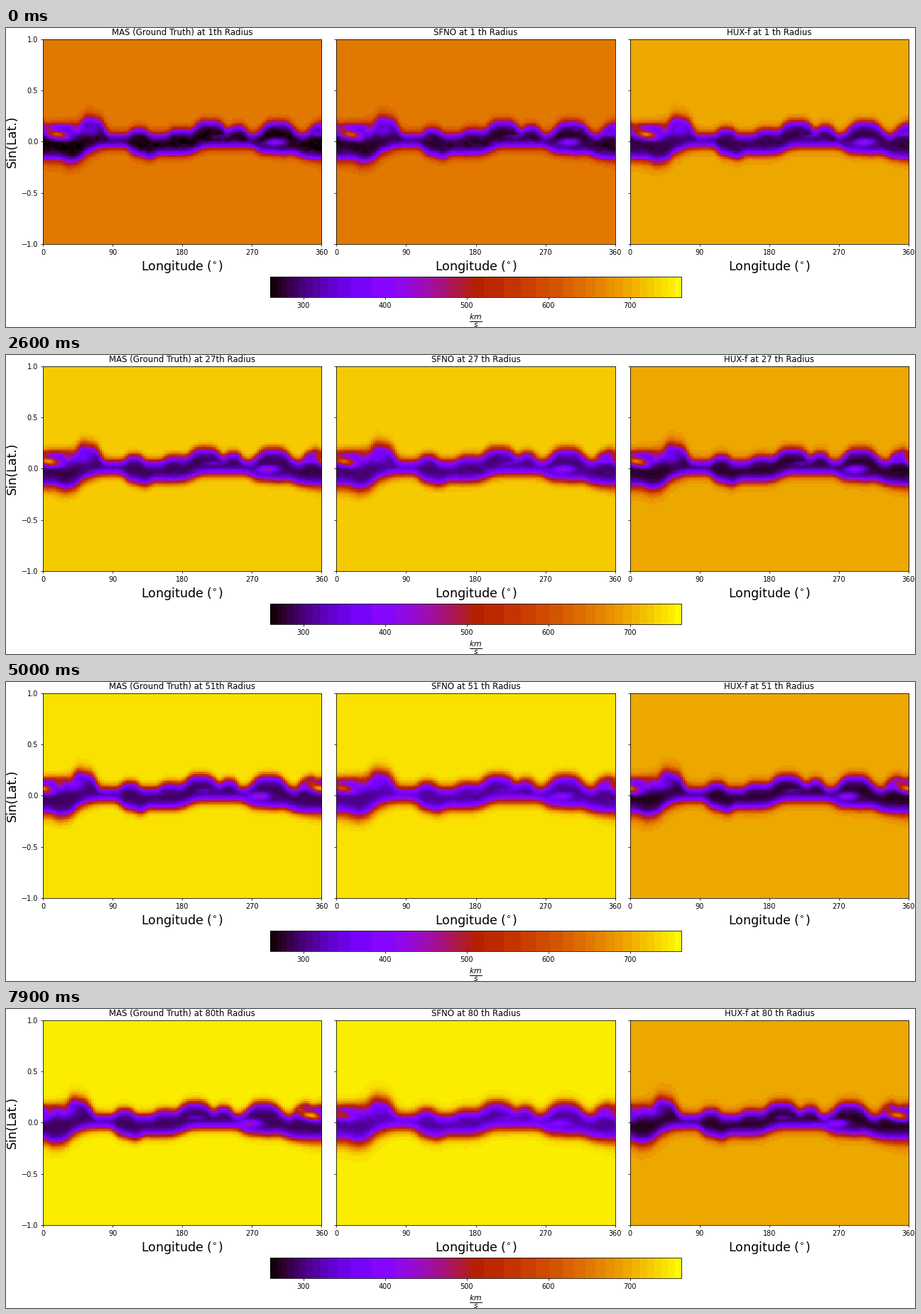
Animation of 1280 by 422 pixels, one loop 8000 ms. Source, as a matplotlib script:

```python
import numpy as np
import matplotlib.pyplot as plt
from matplotlib.animation import FuncAnimation
from matplotlib.colors import BoundaryNorm, ListedColormap

W, H, DPI = 1280, 422, 64
FRAMES, INTERVAL = 80, 100
SLOWEST, FASTEST = 259.5, 763  # km/s
S = 70.2 / DPI  # keeps point sizes at their look on a 70.2 dpi canvas

plt.rcParams.update({
    "font.family": "DejaVu Sans",
    "font.size": 10 * S,
    "axes.linewidth": 0.8 * S,
    "axes.labelpad": 4 * S,
    "axes.titlepad": 6 * S,
})
for axis in ("xtick", "ytick"):
    plt.rcParams.update({
        f"{axis}.major.size": 3.5 * S,
        f"{axis}.major.width": 0.8 * S,
        f"{axis}.major.pad": 3.5 * S,
    })


def stepped_scale(bands):
    """Split gnuplot into bands of equal visible colour change."""
    cmap = plt.get_cmap("gnuplot")
    x = np.linspace(0, 1, 256)
    change = np.diff(cmap(x)[:, :3], axis=0) * (0.6, 1, 0.5)
    path = np.append(0, np.cumsum(np.linalg.norm(change, axis=1)))
    cuts = np.interp(np.linspace(0, path[-1], bands + 1), path, x)
    colours = cmap((cuts[:-1] + cuts[1:]) / 2)
    levels = SLOWEST + (FASTEST - SLOWEST) * cuts
    return ListedColormap(colours), BoundaryNorm(levels, bands)


CMAP, NORM = stepped_scale(44)

# Bulges of the slow belt's edges: longitude, half width, height.
# Heights are hundredths of sin(latitude).
TOP_BASE, BOTTOM_BASE = 8, 6.5
TOP = [(26, 32, 9), (66, 15, 14), (124, 12, 5.5), (176, 14, 4.7),
       (215, 22, 12.5), (252, 11, 8), (303, 22, 12), (352, 10, 6.5)]
BOTTOM = [(10, 52, 12), (40, 14, 4), (128, 17, 8), (168, 34, 7.5),
          (296, 22, 6)]

# Faster patches inside the belt: longitude, height, widths, slope, strength
PATCHES = [
    (18.5, 6.8, 10, 3, -0.12, 0.92),
    (6, 12.5, 4, 2, -0.1, 0.4),
    (42, 11.5, 4, 3.5, -0.2, 0.35),
    (61, 11.5, 10, 5, 0, 0.2),
    (300, -0.8, 8.5, 2.3, 0.03, 0.38),
    (352, 7, 6.5, 2, 0.05, 0.2),
    (230, 5, 7, 1.3, 0.02, 0.12),
]

NLON, NLAT = 128, 111
lons = (np.arange(NLON) + 0.5) * 360 / NLON
heights = np.linspace(-100, 100, NLAT)[:, None]

rng = np.random.default_rng(4)


def make_waves(count, max_lon, max_lat):
    return [(rng.integers(3, max_lon), rng.uniform(-max_lat, max_lat),
             rng.uniform(0, 2 * np.pi)) for _ in range(count)]


def ripple(waves, lon):
    """Smooth noise of unit size, periodic in longitude."""
    x = np.radians(lon)
    total = sum(np.cos(m * x + n * heights + p) for m, n, p in waves)
    return total * np.sqrt(2 / len(waves))


GRAIN = make_waves(24, 45, 0.8)
MOTTLE = make_waves(40, 30, 0.6)


def settle(k, pace):
    """Ease from 0 towards 1."""
    return 1 - np.exp(-k / pace)


def lon_gap(lon, centre):
    return (lon - centre + 180) % 360 - 180


def bulge(lon, centre, width):
    return np.exp(-(lon_gap(lon, centre) / width) ** 4)


def edge(lon, base, bulges):
    return base + sum(h * bulge(lon, c, w) for c, w, h in bulges)


def falloff(depth, width, halo):
    """Share of fast wind at a depth below the belt's edge."""
    d = depth - 0.7
    scale = np.where(d < 0, 0.7 * width * (1 + halo), width)
    return 1 / (1 + np.exp(np.clip(d / scale, -30, 30)))


def wind(edge_shift, core_shift, fast, slow, width, grain,
         fade=1, passes=1):
    """Slow belt whose core drifts faster than its edges."""
    rim, core = lons + edge_shift, lons + core_shift
    upper = falloff(edge(rim, TOP_BASE, TOP) - heights, width,
                    0.55 * bulge(rim, 64, 24))
    lower = falloff(heights + edge(rim, BOTTOM_BASE, BOTTOM), width,
                    0.55 * bulge(rim, 34, 38))
    share = np.maximum(upper, lower)
    for x, y, sx, sy, slope, strength in PATCHES:
        dx = lon_gap(core, x)
        dy = heights - y - slope * dx
        blob = np.exp(-((dx / sx) ** 2 + (dy / sy) ** 2) / 2)
        share = share + fade * strength * blob * (1 - share)
    v = slow + (fast - slow) * share
    v = v + grain * ripple(GRAIN, core) * (1 - share) ** 2
    for _ in range(passes):
        v = (np.roll(v, 1, 1) + 2 * v + np.roll(v, -1, 1)) / 4
    return v


def fast_wind(k):
    return 650 + 102 * settle(k ** 0.85, 11.5)


def mas(k):
    return wind(0.235 * k, 0.417 * k, fast_wind(k),
                260 + 27 * settle(k, 12), 2.6, 6 * np.exp(-k / 20))


def sfno(k):
    drift = settle(k, 25)
    v = wind(8 * drift, 12 * drift, fast_wind(k),
             270 + 39 * settle(k, 30), 2.7 + 0.5 * k / FRAMES, 6,
             1 - 0.45 * k / FRAMES, 1 + k // 20)
    zone = np.exp(-((np.abs(heights) - 42) / 16) ** 2)
    return v - 0.45 * np.maximum(ripple(MOTTLE, lons), 0) * zone


def hux(k):
    return wind(0.25 * k, 0.45 * k - 2, 695, 280 - 12 * settle(k, 20),
                2.6 + 0.4 * k / FRAMES, 4 * np.exp(-k / 15))


PANELS = [
    ("MAS (Ground Truth) at {}th Radius", mas),
    ("SFNO at {} th Radius", sfno),
    ("HUX-f at {} th Radius", hux),
]

fig = plt.figure(figsize=(W / DPI, H / DPI), dpi=DPI, facecolor="white")


def add_axes(left, top, right, bottom):
    return fig.add_axes([left / W, 1 - bottom / H,
                         (right - left) / W, (bottom - top) / H])


views = []
for i, (title, field) in enumerate(PANELS):
    left = 52 + 413.4 * i
    ax = add_axes(left, 15.6, left + 392.2, 305.2)
    image = ax.imshow(field(0), extent=(0, 360, -1, 1), origin="lower",
                      aspect="auto", interpolation="nearest",
                      cmap=CMAP, norm=NORM)
    ax.set_xticks(range(0, 361, 90))
    ax.set_yticks([-1, -0.5, 0, 0.5, 1])
    ax.set_xlabel(r"Longitude ($^{\circ}$)", fontsize=18 * S)
    if i == 0:
        ax.set_ylabel("Sin(Lat.)", fontsize=18 * S)
    else:
        ax.tick_params(labelleft=False)
    views.append((image, ax.set_title(title.format(1))))

bar = fig.colorbar(views[0][0], cax=add_axes(372.4, 351.2, 951.3, 380.3),
                   orientation="horizontal", spacing="proportional",
                   ticks=range(300, 701, 100))
bar.ax.minorticks_off()
bar.set_label(r"$\frac{km}{s}$", fontsize=16 * S)


def update(k):
    for (image, label), (title, field) in zip(views, PANELS):
        image.set_data(field(k))
        label.set_text(title.format(k + 1))
    return [artist for view in views for artist in view]


anim = FuncAnimation(fig, update, frames=FRAMES, interval=INTERVAL,
                     repeat=True, repeat_delay=0)
plt.show()
```
